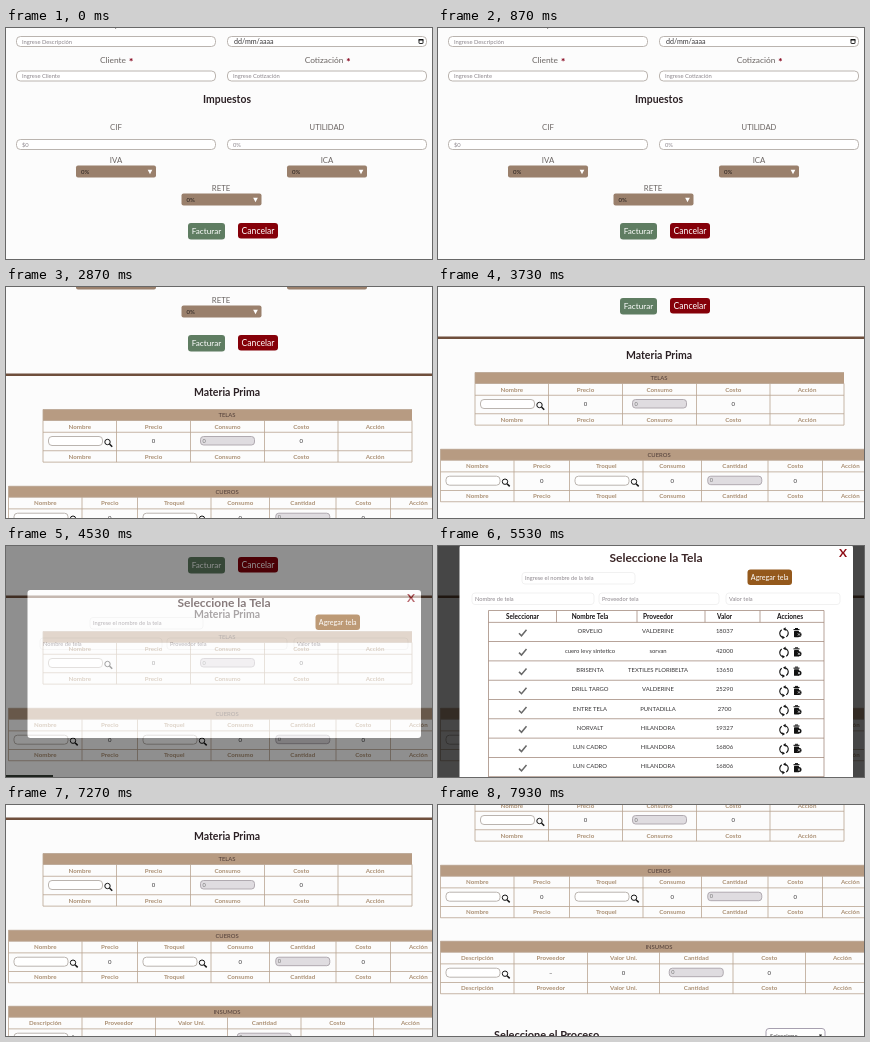
An HTML page with a canvas for the animation above (8 s loop, 426 by 231 pixels).

```html
<!DOCTYPE html>
<html lang="es">
<head>
<meta charset="utf-8">
<title>Formulario de cotización</title>
<style>
html, body { margin: 0; width: 100%; height: 100%; overflow: hidden; background: #fcfcfc; }
canvas { display: block; width: 100vw; height: 100vh; }
</style>
</head>
<body>
<canvas id="stage"></canvas>
<script>
const W = 426, H = 231, LOOP = 8000;
const FONT = 'Lato, "Open Sans", sans-serif';
const C = {
  page: '#fcfcfc', ink: '#383638', dark: '#2b2024', label: '#6a6462', hint: '#8c868c',
  band: '#b79b82', line: '#b9a592', head: '#ab9074', select: '#9a806c',
  field: '#b3aca6', off: '#dfdce0', brown: '#6f4f3c', red: '#850009', green: '#5f7d62'
};

const canvas = document.getElementById('stage');
const screen = canvas.getContext('2d');
const layer = document.createElement('canvas');
const layerCtx = layer.getContext('2d');
let g = screen;

function resize() {
  const r = window.devicePixelRatio || 1;
  for (const c of [canvas, layer]) {
    c.width = Math.round(innerWidth * r);
    c.height = Math.round(innerHeight * r);
  }
}

// [time, value] pairs with eased travel between them
const SCROLL = [[0, 35], [900, 35], [1600, 0], [1950, 0], [2800, 182], [2950, 182],
  [3500, 219], [6300, 219], [6800, 256], [7350, 256], [7900, 321], [8000, 321]];
const FADE = [[0, 0], [4400, 0], [4620, 1], [6050, 1], [6250, 0], [8000, 0]];
const LOADED = 4900;

const smooth = p => p * p * (3 - 2 * p);

function track(keys, t, ease = p => p) {
  const i = Math.max(1, keys.findIndex(k => k[0] >= t));
  const [t0, a] = keys[i - 1], [t1, b] = keys[i];
  return a + (b - a) * ease((t - t0) / (t1 - t0));
}

function text(s, x, y, size, color = C.ink, align = 'center', weight = 400) {
  g.font = `${weight} ${size}px ${FONT}`;
  g.fillStyle = color;
  g.textAlign = align;
  g.fillText(s, x, y + size * 0.35);
}

function rect(x, y, w, h, color) {
  g.fillStyle = color;
  g.fillRect(x, y, w, h);
}

function box(x, y, w, h, r, fill, stroke) {
  g.beginPath();
  g.roundRect(x, y, w, h, r);
  if (fill) { g.fillStyle = fill; g.fill(); }
  if (stroke) { g.strokeStyle = stroke; g.lineWidth = 0.9; g.stroke(); }
}

function path(points, color, width) {
  g.beginPath();
  points.forEach(([x, y], i) => i ? g.lineTo(x, y) : g.moveTo(x, y));
  g.strokeStyle = color;
  g.lineWidth = width;
  g.stroke();
}

const hLine = (x0, x1, y, color) => rect(x0, y - 0.4, x1 - x0, 0.8, color);
const vLine = (x, y0, y1, color) => rect(x - 0.4, y0, 0.8, y1 - y0, color);

function input(x, y, hint) {
  box(x + 0.5, y + 0.5, 199, 10, 4, '#fff', C.field);
  text(hint, x + 6, y + 5.5, 5.8, C.hint, 'left');
}

function required(s, x, y) {
  text(s, x - 3, y, 8.4, C.label);
  const half = g.measureText(s).width / 2;
  text('*', x + half, y + 1, 10, '#8c1028', 'left', 900);
}

function triangle(x, y, r, color) {
  g.beginPath();
  g.moveTo(x - r, y - r);
  g.lineTo(x + r, y - r);
  g.lineTo(x, y + r);
  g.fillStyle = color;
  g.fill();
}

function percent(x, y) {
  box(x, y, 80, 12, 2, C.select);
  text('0%', x + 5, y + 6, 6, '#211b1a', 'left');
  triangle(x + 74, y + 6.5, 2.3, '#fff');
}

function button(s, x, y, w, h, color, size = 8.2) {
  box(x, y, w, h, 3, color);
  text(s, x + w / 2, y + h / 2, size, '#fff');
}

function drawForm() {
  required('Descripción', 110, 32);
  required('Fecha', 322, 32);
  input(10, 43, 'Ingrese Descripción');
  input(221, 43, '');
  text('dd/mm/aaaa', 228, 48.5, 7.1, C.ink, 'left');
  box(413, 46.5, 4, 4, 0.5, null, '#111');
  rect(412.6, 46, 4.8, 1.5, '#111');
  required('Cliente', 110, 67);
  required('Cotización', 321, 67);
  input(10, 77.5, 'Ingrese Cliente');
  input(221, 77.5, 'Ingrese Cotización');

  text('Impuestos', 221, 106, 10.4, C.dark, 'center', 700);
  text('CIF', 110, 134.5, 7.8, C.label);
  text('UTILIDAD', 321, 134.5, 7.6, C.label);
  input(10, 146, '$0');
  input(221, 146, '0%');
  text('IVA', 110, 167.5, 7.8, C.label);
  text('ICA', 321, 167.5, 7.8, C.label);
  percent(70, 172.5);
  percent(281, 172.5);
  text('RETE', 215, 195.5, 7.8, C.label);
  percent(175.5, 200.5);
  button('Facturar', 182, 230, 37, 16.5, C.green);
  button('Cancelar', 232, 230, 40, 15.5, C.red, 8.6);
  rect(0, 268.5, W, 2.5, C.brown);
  text('Materia Prima', 221, 287, 10.5, C.dark, 'center', 700);
}

function lens(x, y) {
  g.beginPath();
  g.arc(x - 1, y - 1, 2.7, 0, Math.PI * 2);
  g.strokeStyle = '#151515';
  g.lineWidth = 1;
  g.stroke();
  path([[x + 1, y + 1], [x + 3.7, y + 3.7]], '#151515', 1.5);
}

// Cell kinds: 'find' search field, 'off' disabled field, otherwise plain text
function grid(title, y, edges, heads, cells, mid) {
  const x0 = edges[0], x1 = edges[edges.length - 1];
  rect(x0, y, x1 - x0, 11, C.band);
  text(title, mid, y + 5.7, 5.9, '#4d3b36');
  for (const dy of [0, 11, 22.7, 41.3, 52.6]) hLine(x0, x1, y + dy, C.line);
  vLine(x0, y, y + 11, C.line);
  edges.forEach(x => vLine(x, y + 11, y + 52.6, C.line));
  heads.forEach((h, i) => {
    const cx = (edges[i] + edges[i + 1]) / 2;
    text(h, cx, y + 16.9, 6.2, C.head, 'center', 700);
    text(h, cx, y + 46.9, 6.2, C.head, 'center', 700);
    const kind = cells[i];
    if (kind === 'find') {
      box(edges[i] + 5.5, y + 27, 54, 9, 3.5, '#fff', C.field);
      lens(edges[i] + 65.5, y + 33.5);
    } else if (kind === 'off') {
      box(cx - 27, y + 27, 54, 8.5, 3, C.off, '#aaa3aa');
      text('0', cx - 25, y + 31.3, 5.6, '#777', 'left');
    } else if (kind) {
      text(kind, cx, y + 31.3, 6, C.ink);
    }
  });
}

function drawTables() {
  grid('TELAS', 304.5, [37, 110.5, 184.5, 258.5, 332, 406],
    ['Nombre', 'Precio', 'Consumo', 'Costo', 'Acción'],
    ['find', '0', 'off', '0', ''], 221);
  grid('CUEROS', 381.2, [2.5, 76, 131.5, 205, 263.5, 330, 384.5, 440],
    ['Nombre', 'Precio', 'Troquel', 'Consumo', 'Cantidad', 'Costo', 'Acción'],
    ['find', '0', 'find', '0', 'off', '0', ''], 221);
  grid('INSUMOS', 457.2, [2.5, 76, 149.5, 221.5, 295, 367.5, 441],
    ['Descripción', 'Proveedor', 'Valor Uni.', 'Cantidad', 'Costo', 'Acción'],
    ['find', '–', '0', 'off', '0', ''], 221);
  text('Seleccione el Proceso', 56, 551, 11, C.dark, 'left', 700);
  box(328, 544.5, 59, 13, 3, '#fff', '#9d96a6');
  text('Seleccione', 332, 551.5, 5.9, C.ink, 'left');
  triangle(382.5, 552, 1.5, '#222');
}

const FABRICS = [
  ['ORVELIO', 'VALDERINE', 18037], ['cuero levy sintetico', 'sorvan', 42000],
  ['BRISENTA', 'TEXTILES FLORIBELTA', 13650], ['DRILL TARGO', 'VALDERINE', 25290],
  ['ENTRE TELA', 'PUNTADILLA', 2700], ['NORVALT', 'HILANDORA', 19327],
  ['LUN CADRO', 'HILANDORA', 16806], ['LUN CADRO', 'HILANDORA', 16806]
];

function refreshIcon(x, y) {
  g.strokeStyle = g.fillStyle = '#111';
  g.lineWidth = 1.2;
  for (const turn of [0, Math.PI]) {
    g.save();
    g.translate(x, y);
    g.rotate(turn);
    g.beginPath();
    g.arc(0, 0, 4.2, -1.3, 1);
    g.stroke();
    g.beginPath();
    g.moveTo(-1, -4.2);
    g.lineTo(1.6, -6);
    g.lineTo(1.6, -2.4);
    g.fill();
    g.restore();
  }
}

function binIcon(x, y) {
  rect(x - 3.5, y - 4, 6, 1.1, '#111');
  rect(x - 2, y - 5, 3, 1, '#111');
  box(x - 3, y - 2.3, 5, 6.5, 0.6, '#111');
  g.beginPath();
  g.arc(x + 2, y + 1.5, 2.5, 0, Math.PI * 2);
  g.fillStyle = '#111';
  g.fill();
  path([[x + 0.9, y + 0.4], [x + 3.1, y + 2.6]], '#fff', 0.7);
  path([[x + 3.1, y + 0.4], [x + 0.9, y + 2.6]], '#fff', 0.7);
}

function drawFabrics() {
  const edges = [50.5, 118.5, 199, 267, 322, 386];
  const heads = ['Seleccionar', 'Nombre Tela', 'Proveedor', 'Valor', 'Acciones'];
  const centers = [84.5, 152, 220, 286.5, 352];
  const top = 64.5, first = 76.3, step = 19.3, line = '#a58d80';
  heads.forEach((h, i) => text(h, centers[i], 70.3, 6.5, '#171315', 'center', 700));
  hLine(50.5, 386, top, line);
  edges.forEach((x, i) => vLine(x, top, i % 5 ? first : H + 10, line));
  FABRICS.forEach((row, i) => {
    const y = first + i * step;
    hLine(50.5, 386, y, line);
    row.forEach((s, k) => text(String(s), centers[k + 1], y + 9, 5.9, C.ink));
    path([[81, y + 11], [83.5, y + 13.5], [88.5, y + 7.5]], '#686868', 1.5);
    refreshIcon(346, y + 11);
    binIcon(359, y + 10.7);
  });
  hLine(50.5, 386, first + FABRICS.length * step, line);
}

function softField(x, y, w, hint) {
  box(x, y, w, 11.5, 3, '#fff', '#f0f0f0');
  text(hint, x + 3, y + 5.8, 5.7, C.hint, 'left');
}

function drawModal(loaded) {
  rect(0, 0, W, H, 'rgba(0,0,0,.72)');
  g.save();
  if (!loaded) g.translate(0, 45);
  box(21.5, -1, 393.5, loaded ? 260 : 148, 3, '#fff');
  text('Seleccione la Tela', 218, 12.2, 12, '#3a2526', 'center', 700);
  text('X', 405, 7, 12, '#8e0b14', 'center', 700);
  softField(84, 26.5, 113, 'Ingrese el nombre de la tela');
  button('Agregar tela', 309.5, 23.5, 44.5, 15.5, '#94591c', 7.1);
  softField(34, 47, 122, 'Nombre de tela');
  softField(161, 47, 120, 'Proveedor tela');
  softField(288, 47, 114, 'Valor tela');
  if (loaded) drawFabrics();
  g.restore();
}

function begin(ctx) {
  g = ctx;
  g.setTransform(canvas.width / W, 0, 0, canvas.height / H, 0, 0);
  g.clearRect(0, 0, W, H);
}

function render(t) {
  const fade = track(FADE, t);
  if (fade > 0) {
    begin(layerCtx);
    drawModal(t >= LOADED);
  }
  begin(screen);
  rect(0, 0, W, H, C.page);
  g.save();
  g.translate(0, -track(SCROLL, t, smooth));
  drawForm();
  drawTables();
  g.restore();
  if (fade > 0) {
    g.globalAlpha = fade;
    g.drawImage(layer, 0, 0, W, H);
    g.globalAlpha = 1;
    if (t < LOADED) rect(0, 229, 47, 2, '#1f241f');
  }
}

function tick() {
  render(performance.now() % LOOP);
  requestAnimationFrame(tick);
}

addEventListener('resize', resize);
resize();
tick();
</script>
</body>
</html>
```
